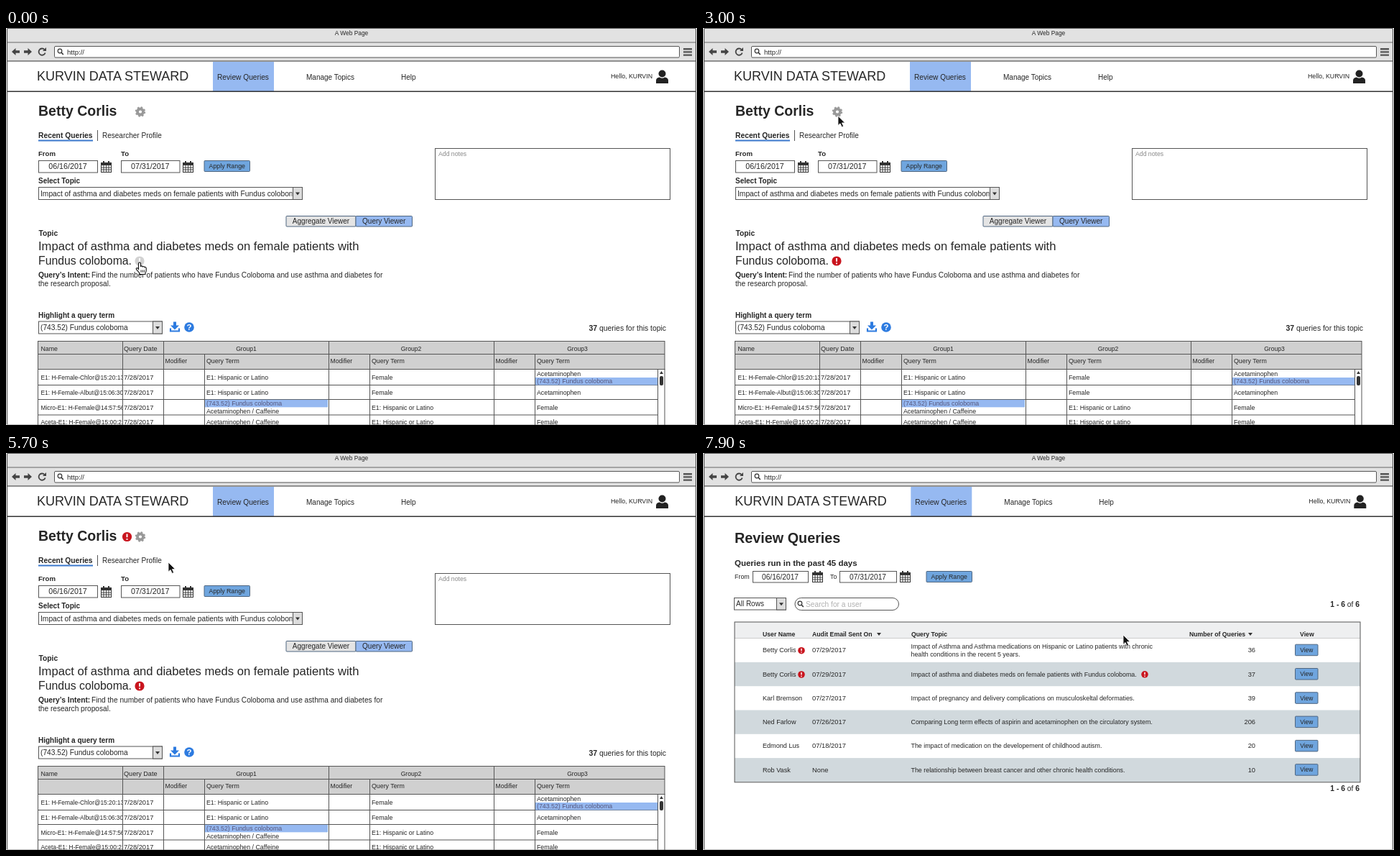
Animation of 962x552 px, one loop 8 s. Source, as an HTML page:

```html
<!DOCTYPE html>
<html lang="en">
<head>
<meta charset="utf-8">
<title>Data steward prototype</title>
<style>
html, body { margin: 0; width: 100%; height: 100%; overflow: hidden; background: #fff; }
#stage { display: block; width: 100%; height: 100%; }
text { font-family: 'Liberation Sans', Arial, sans-serif; fill: #262626; white-space: pre; }
</style>
</head>
<body>
<svg id="stage" viewBox="0 0 962 552"></svg>
<script>
const INK = '#333', LINE = '#555', BLUE = '#96b9f1', BUTTON = '#6fa5de', RED = '#c9151e';

// drawing helpers, all return markup
const text = (x, y, s, size, attrs = '') => `<text x="${x}" y="${y}" font-size="${size}" ${attrs}>${s}</text>`;
const bold = (x, y, s, size, attrs = '') => text(x, y, s, size, 'font-weight="700" ' + attrs);
const mid = (x, y, s, size, attrs = '') => text(x, y, s, size, 'text-anchor="middle" ' + attrs);
const rect = (x, y, w, h, fill = '#fff', stroke = LINE, attrs = '') =>
  `<rect x="${x}" y="${y}" width="${w}" height="${h}" fill="${fill}" stroke="${stroke}" ${attrs}/>`;
const path = (d, fill = 'none', stroke = LINE, w = 1, attrs = '') =>
  `<path d="${d}" fill="${fill}" stroke="${stroke}" stroke-width="${w}" ${attrs}/>`;
const circle = (x, y, r, fill, stroke = 'none', w = 1) =>
  `<circle cx="${x}" cy="${y}" r="${r}" fill="${fill}" stroke="${stroke}" stroke-width="${w}"/>`;
const group = (id, body, attrs = '') => `<g id="${id}" ${attrs}>${body}</g>`;
const clipped = (x, y, w, h, body) =>
  `<svg x="${x}" y="${y}" width="${w}" height="${h}" viewBox="${x} ${y} ${w} ${h}">${body}</svg>`;

const down = (x, y, r = 3) => path(`M${x - r} ${y - r / 2}h${2 * r}l${-r} ${r * 1.3}z`, INK, 'none');
const lens = (x, y) => circle(x, y, 2.8, 'none', INK, 1.2) + path(`M${x + 2} ${y + 2}l2.8 3`, 'none', INK, 1.6);
const alertMark = (x, y, r = 6.6, fill = RED) =>
  circle(x, y, r, fill) + path(`M${x} ${y - r * .62}v${r * .72}M${x} ${y + r * .36}v${r * .3}`, 'none', '#fff', r * .3);
const calendar = (x, y) =>
  rect(x + .5, y + 2.5, 14, 13, '#fff', INK) + rect(x, y + 2, 15, 4, INK, 'none') +
  path(`M${x + 4} ${y}v4M${x + 11} ${y}v4`, 'none', INK, 2) +
  path(`M${x + 4} ${y + 6}v9M${x + 7.5} ${y + 6}v9M${x + 11} ${y + 6}v9M${x} ${y + 9}h15M${x} ${y + 12}h15`, 'none', INK, .9);
const button = (x, y, w, h, s, size, fill = BUTTON) =>
  rect(x, y, w, h, fill, '#4f6680', 'rx="1"') + mid(x + w / 2, y + h / 2 + size * .36, s, size);
const select = (x, y, w, h, s, size) =>
  rect(x, y, w, h) + rect(x + w - 13, y, 13, h, '#ddd') + down(x + w - 6.5, y + h / 2) +
  clipped(x + 1, y, w - 15, h, text(x + 2.5, y + h / 2 + 3.6, s, size));
const field = (x, y, w, h, s, size) => rect(x, y, w, h) + mid(x + w / 2 - .5, y + h / 2 + 3.6, s, size);
const gear = (x, y) =>
  circle(x, y, 4, 'none', '#999', 3.8) +
  `<circle cx="${x}" cy="${y}" r="6.2" fill="none" stroke="#999" stroke-width="2" stroke-dasharray="2.435"/>`;

function browser() {
  return rect(0, 0, 962, 552, '#fff', 'none') + rect(1, 0, 960, 46, '#e2e2e2', 'none') +
    path('M1 20H961', 'none', '#666') + path('M1 46H961', 'none', INK, 1.2) +
    path('M1.5 552V2Q1.5 .5 3 .5H959Q960.5 .5 960.5 2V552', 'none', LINE, 1.2) +
    path('M1 551.5H961', 'none', '#bbb') +
    mid(481, 10, 'A Web Page', 8.4) +
    path('M8 33l5.5-5v3.3h5.5v3.4h-5.5V38zM36 33l-5.5-5v3.3H25v3.4h5.5V38z', '#444', 'none') +
    path('M53.6 30A4.6 4.6 0 1 0 54.6 34.5', 'none', '#444', 1.8) + path('M56 27v5h-5z', '#444', 'none') +
    rect(67.5, 25.5, 870, 15.5, '#fff', LINE, 'rx="1.5"') + lens(75, 32) + text(85, 36.8, 'http://', 9.6) +
    path('M943 29.2h12M943 33.4h12M943 37.6h12', 'none', '#555', 2.4);
}

function header() {
  return rect(288, 47, 85, 41, BLUE, 'none') + text(43, 73, 'KURVIN DATA STEWARD', 18) +
    text(294, 71.5, 'Review Queries', 10.2) + text(418, 71.5, 'Manage Topics', 10) + text(550, 71.5, 'Help', 10) +
    text(842, 69.5, 'Hello, KURVIN', 8.8) + circle(913.5, 63.5, 5, '#222') +
    path('M905 77V73Q905 69 910 68.5Q913.5 71 917 68.5Q922 69 922 73V77Z', '#222', 'none');
}

const COLS = [162, 219, 276, 449, 506, 679, 736];

function grid() {
  const size = 8.8, term = '(743.52) Fundus coloboma';
  const marked = (x, y, w) => rect(x, y, w, 10.5, BLUE, 'none') + text(x + 2, y + 8, term, size, 'style="fill:#56567c"');
  let s = rect(44.5, 435.5, 872.5, 39, '#d0d0d0') + path('M44.5 453.5H917M44.5 496.5H907.5M44.5 516.5H907.5M44.5 538H907.5') +
    path('M44.5 474V552M907.5 475V552M917 474V552');
  for (const x of COLS) s += path(`M${x + .5} ${[276, 506, 736].includes(x) ? 453 : 436}V552`);
  s += text(48.5, 449, 'Name', size) + text(164, 449, 'Query Date', 9.1);
  [334.5, 564, 795.5].forEach((x, i) => s += mid(x, 449, 'Group' + (i + 1), 8.6));
  for (const x of [219, 449, 679]) s += text(x + 2.5, 466, 'Modifier', 8.6) + text(x + 60, 466, 'Query Term', size);
  const latino = 'E1: Hispanic or Latino', mix = 'Acetaminophen / Caffeine';
  [
    ['E1: H-Female-Chlor@15:20:13', latino, 'Female', ''],
    ['E1: H-Female-Albut@15:06:30', latino, 'Female', 'Acetaminophen'],
    ['Micro-E1: H-Female@14:57:56', '', latino, 'Female'],
    ['Aceta-E1: H-Female@15:00:21', mix, latino, 'Female']
  ].forEach(([name, ...terms], i) => {
    const y = [489, 510, 530.5, 551][i];
    s += clipped(45, y - 10, 117, 14, text(48.5, y, name, 8.4)) + text(164, y, '7/28/2017', 9.3);
    terms.forEach((t, k) => s += text(279 + 230 * k, y, t, size));
  });
  return s + text(739, 484, 'Acetaminophen', size) + marked(737, 486, 170) +
    marked(277, 516.8, 171) + text(279, 536, mix, size) +
    path('M910 481l2.5-4 2.5 4z', INK, 'none') + rect(910, 484, 5, 13, INK, 'none', 'rx="2"');
}

function detail() {
  const topic = 'Impact of asthma and diabetes meds on female patients with';
  return header() + bold(45, 122, 'Betty Corlis', 19.5) + gear(187, 116.5) +
    bold(45, 152.5, 'Recent Queries', 10.3) + path('M45 156.5H121', 'none', '#3b78cc', 1.8) +
    path('M127.5 142V157') + text(134, 152.5, 'Researcher Profile', 10) +
    bold(45, 178, 'From', 9.6) + bold(160, 178, 'To', 9.6) +
    field(45.5, 184.5, 82, 16.5, '06/16/2017', 10.7) + calendar(132, 185) +
    field(160.5, 184.5, 81.5, 16.5, '07/31/2017', 10.7) + calendar(246, 185) +
    button(276, 184.5, 63.5, 15, 'Apply Range', 8.8) +
    rect(597.5, 167.5, 327, 71) + text(602, 178, 'Add notes', 8.7, 'style="fill:#888"') +
    bold(45, 216, 'Select Topic', 10) + select(45.5, 221.5, 367, 17, topic + ' Fundus coloboma.', 10.25) +
    button(390, 261.5, 97, 14.5, 'Aggregate Viewer', 10, '#e4e4e4') +
    button(487, 261.5, 78.5, 14.5, 'Query Viewer', 10, BLUE) +
    bold(45.5, 288.5, 'Topic', 10.3) + text(45, 309, topic, 16.6) + text(45, 328.5, 'Fundus coloboma.', 15.8) +
    bold(45, 346.5, 'Query’s Intent:', 10.3) +
    text(119, 346.5, 'Find the number of patients who have Fundus Coloboma and use asthma and diabetes for', 10.15) +
    text(45, 358.5, 'the research proposal.', 10.15) +
    bold(45, 403, 'Highlight a query term', 10) + select(45.5, 408, 172, 17, '(743.52) Fundus coloboma', 10.2) +
    path('M233 408.5h4v5h4l-6 6-6-6h4z', '#2d7be0', 'none') + path('M229 417.5v4h12v-4', 'none', '#2d7be0', 2.2) +
    circle(255, 416, 6.8, '#2d7be0') + bold(255, 420.2, '?', 11.5, 'text-anchor="middle" style="fill:#fff"') +
    text(919, 421, '<tspan font-weight="700">37</tspan> queries for this topic', 10.4, 'text-anchor="end"') + grid() +
    group('flagOff', alertMark(186, 324, 6.6, '#d2d2d2')) + group('flagOn', alertMark(186, 324)) +
    group('userFlag', alertMark(168.5, 116.5)) +
    group('menu', rect(179.5, 127.5, 128.5, 47, '#fff', '#777') + group('hover', rect(180, 143, 127.5, 15.5, BLUE, 'none')) +
      ['Share this page', 'Mark this researcher', 'Email this researcher']
        .map((s, i) => text(192, 138.7 + 15.4 * i, s, 10.2)).join(''));
}

function list() {
  const count = y => text(914, y, '<tspan font-weight="700">1 - 6</tspan> of <tspan font-weight="700">6</tspan>', 10.3, 'text-anchor="end"');
  let s = group('banner', header(), 'transform="translate(1.3 0)"') + bold(44, 124.5, 'Review Queries', 19.8) +
    bold(44, 157, 'Queries run in the past 45 days', 11.5) +
    text(44, 175.2, 'From', 8.9) + field(69.5, 164.5, 77, 15.5, '06/16/2017', 10.2) + calendar(152, 164) +
    text(177, 175.2, 'To', 8.9) + field(190.5, 164.5, 79, 15.5, '07/31/2017', 10.2) + calendar(274, 164) +
    button(311, 164.5, 63.5, 15, 'Apply Range', 8.8) +
    select(43.5, 201.5, 72, 16.5, 'All Rows', 10) +
    rect(128, 201.5, 144.5, 17, '#fff', LINE, 'rx="8.5"') + lens(135, 209) +
    text(143, 213.5, 'Search for a user', 10.2, 'style="fill:#b0b0b0"') + count(214) + count(469.5) +
    rect(44, 235, 871, 22.5, '#eeeff0', 'none');
  [[83, 'User Name'], [152, 'Audit Email Sent On'], [290, 'Query Topic'], [677, 'Number of Queries'], [831, 'View']]
    .forEach(([x, h]) => s += bold(x, 255.3, h, 8.7));
  s += down(245, 251.5) + down(762, 251.5);
  [
    ['Betty Corlis', '07/29/2017', '', 36],
    ['Betty Corlis', '07/29/2017', 'Impact of asthma and diabetes meds on female patients with Fundus coloboma.', 37],
    ['Karl Bremson', '07/27/2017', 'Impact of pregnancy and delivery complications on musculoskeltal deformaties.', 39],
    ['Ned Farlow', '07/26/2017', 'Comparing Long term effects of aspirin and acetaminophen on the circulatory system.', 206],
    ['Edmond Lus', '07/18/2017', 'The impact of medication on the developement of childhood autism.', 20],
    ['Rob Vask', 'None', 'The relationship between breast cancer and other chronic health conditions.', 10]
  ].forEach(([name, date, topic, n], i) => {
    const y = 274.2 + 33.3 * i;
    if (i % 2) s += rect(44, y - 16.6, 871, 33.3, '#d1d9dd', 'none');
    s += text(83, y + 3, name, 9.1) + text(152, y + 3, date, 9.4) + text(289.5, y + 3, topic, 8.9) +
      text(769, y + 3, n, 9.3, 'text-anchor="end"') + button(824.5, y - 8, 31.5, 15.5, 'View', 8.4);
    if (i < 2) s += alertMark(137, y + .5, 4.8);
  });
  return s + text(289.5, 272, 'Impact of Asthma and Asthma medications on Hispanic or Latino patients with chronic', 8.9) +
    text(289.5, 283, 'health conditions in the recent 5 years.', 8.9) + alertMark(615, 307.8, 4.8) +
    path('M44 257.5H915', 'none', '#ccc') + rect(44, 235, 871, 222.8, 'none');
}

const ARROW = path('M0 0V13.2L3 10.5L5.3 15.4L7.6 14.3L5.4 9.6H9.6Z', '#111', '#fff', .8);
const HAND = path('M-1.5 1.5Q-1.5 0 0 0Q1.5 0 1.5 1.5V6Q1.5 4.8 2.8 4.9Q4.1 5 4.1 6.4Q4.3 5.4 5.5 5.5Q6.7 5.7 6.7 7Q7 6.2 8 6.4Q9.2 6.8 9.2 8V11Q9.2 13 8 14.5V16.5H0V15L-4.5 9.6Q-5.2 8.2-4 7.7Q-2.8 7.3-1.5 9.3Z', '#fff', '#111', 1.1) +
  path('M2 10.5v3.2M4.2 10.5v3.2M6.4 10.5v3.2', 'none', '#111', .9);

const stage = document.getElementById('stage');
stage.innerHTML = browser() + group('detail', detail()) + group('list', list()) +
  path('M2 88.3H960', 'none', INK, 1.5) +
  group('cursor', group('arrow', ARROW) + group('hand', HAND, 'transform="translate(-2 -1)"'));

const LOOP = 8000, STEP = 100;
const AT = { flag: 2000, menu: 3500, hover: 4100, mark: 5600, list: 6800 };
// time, x, y of the pointer tip
const TRAIL = [
  [2200, 188, 327], [3100, 188, 115], [3600, 188, 115], [3900, 223, 143], [4100, 226, 152],
  [5700, 226, 152], [6500, 313, 73], [7300, 312, 73], [7900, 585, 253]
];
const byId = id => document.getElementById(id);
const show = (id, on) => byId(id).setAttribute('display', on ? 'inline' : 'none');
const within = (t, a, b) => t >= a && t < b;

function pointer(t) {
  const i = TRAIL.findIndex(k => k[0] > t);
  if (i < 1) return TRAIL[i ? TRAIL.length - 1 : 0].slice(1);
  const [a, x0, y0] = TRAIL[i - 1], [b, x1, y1] = TRAIL[i];
  const u = (t - a) / (b - a), e = u * u * (3 - 2 * u);
  return [x0 + (x1 - x0) * e, y0 + (y1 - y0) * e];
}

function draw(t) {
  show('detail', t < AT.list);
  show('list', t >= AT.list);
  show('flagOff', t < AT.flag);
  show('flagOn', t >= AT.flag);
  show('menu', within(t, AT.menu, AT.mark));
  show('hover', within(t, AT.hover, AT.mark));
  show('userFlag', t >= AT.mark);
  const hand = t < AT.flag || within(t, 3100, AT.menu) || within(t, AT.hover, AT.mark) || within(t, 6400, AT.list);
  show('hand', hand);
  show('arrow', !hand);
  byId('cursor').setAttribute('transform', `translate(${pointer(t).map(v => v.toFixed(1)).join(' ')})`);
}

const start = performance.now();
function tick() {
  const t = (performance.now() - start) % LOOP;
  draw(Math.floor(t / STEP) * STEP);
  requestAnimationFrame(tick);
}
tick();
</script>
</body>
</html>
```
